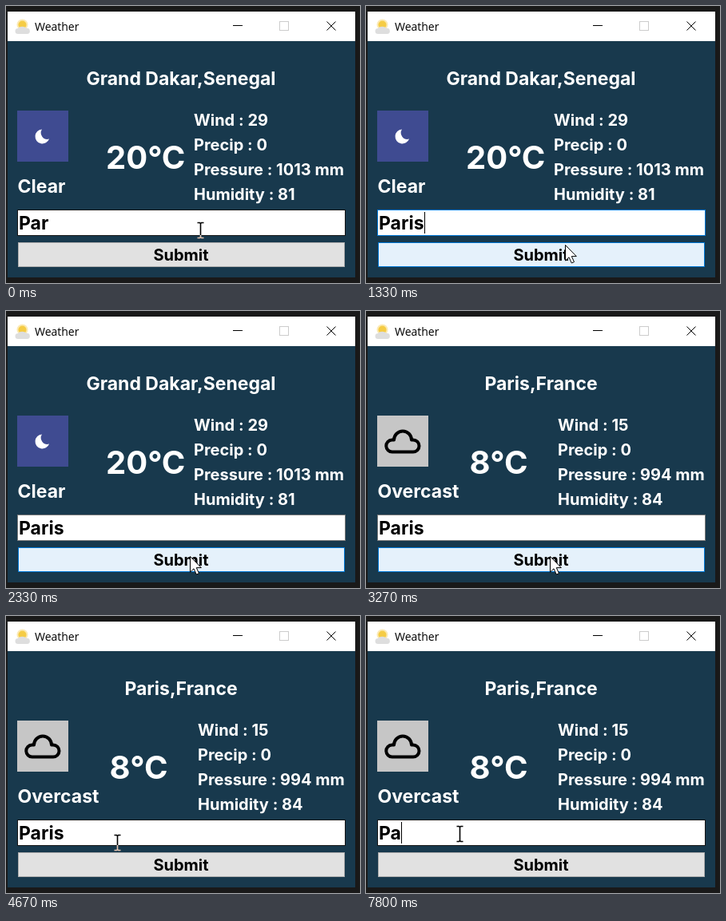
Write an HTML page that moves like this. It is 443x347 px and loops after 8 s.

```html
<!DOCTYPE html>
<html lang="en">
<head>
<meta charset="utf-8">
<title>Weather</title>
<style>
html, body { margin: 0; width: 100%; height: 100%; overflow: hidden; background: #191919; }
svg { display: block; width: 443px; height: 347px; }
text { font-family: Inter, "Liberation Sans", sans-serif; font-weight: 700; white-space: pre; }
.s { font-size: 20px; }
.m { font-size: 23px; }
.l { font-size: 40px; }
.w { fill: #fff; }
.bar { font: 400 14px "Open Sans", sans-serif; }
#beam { mix-blend-mode: difference; }
</style>
</head>
<body>
<svg viewBox="0 0 443 347">
  <rect width="443" height="347" fill="#191919"/>
  <rect x="2" y="7" width="435" height="333" fill="#18394d"/>
  <rect x="2" y="7" width="435" height="37" fill="#fff"/>

  <circle cx="20.500" cy="23.500" r="7" fill="#fbeab5"/>
  <circle cx="20.500" cy="23.500" r="5" fill="#f5cc45"/>
  <path d="M15 35a3.500 3.500 0 0 1 0-7a6 4.500 0 0 1 10.500 0a3.500 3.500 0 0 1 1.500 7z" fill="#dedede"/>
  <text class="bar" x="36" y="31">Weather</text>
  <g fill="none" shape-rendering="crispEdges">
    <path d="M284 24.500h12" stroke="#000"/>
    <rect x="342.500" y="19.500" width="11" height="11" stroke="#ccc"/>
  </g>
  <path d="M401.500 19.500l11 11m0-11l-11 11" stroke="#000"/>

  <g id="before" class="w">
    <rect x="14" y="131" width="64" height="64" fill="#3f4b91"/>
    <path d="M45 154.500a9 9 0 1 0 9 12a8 8 0 0 1-9-12z"/>
  </g>
  <g id="after" class="w">
    <rect x="14" y="131" width="64" height="64" fill="#c6c6c6"/>
    <path d="M33 176.500a7.500 7.500 0 0 1-.5-15h2.500a11 11 0 0 1 22 0h2a7.500 7.500 0 0 1 0 15z"
      fill="none" stroke="#000" stroke-width="4" stroke-linejoin="round"/>
  </g>

  <rect id="field" x="14.500" y="255.500" width="410" height="32" fill="#fff"/>
  <text id="typed" class="m" x="16" y="280"></text>
  <rect id="caret" y="258" width="1" height="27"/>
  <rect id="button" x="15.500" y="296.500" width="408" height="30"/>
  <text class="s" x="219" y="319" text-anchor="middle">Submit</text>

  <path id="beam" d="M-3.500-9.500h3l1 1l1-1h3M.5-8.500v17M-3.500 9.500h3l1-1l1 1h3" fill="none" stroke="#fff" stroke-width="1.600"/>
  <path id="arrow" d="M.5.5v19.500l4.500-4.200l3.300 7.200l3.200-1.400l-3.200-7h6z" fill="#fff" stroke="#000"/>
</svg>
<script>
const LOOP = 8000, FRAME = 1000 / 15, BLINK = 530;
const PRESS = 2200, RELEASE = 2330, REPLY = 3270, REFOCUS = 6400;
const $ = id => document.getElementById(id);

function label(group, cls, x, y, words, anchor = "start") {
  const el = document.createElementNS("http://www.w3.org/2000/svg", "text");
  el.setAttribute("class", cls);
  el.setAttribute("x", x);
  el.setAttribute("y", y);
  el.setAttribute("text-anchor", anchor);
  el.textContent = words;
  $(group).append(el);
}

function report(group, city, sky, temp, tempX, rowX, rows) {
  label(group, "m", 219, 99, city, "middle");
  label(group, "m", 14.5, 234, sky);
  label(group, "l", tempX, 204, temp);
  rows.forEach((row, i) => label(group, "s", rowX, 150 + 31 * i, row));
}

report("before", "Grand Dakar,Senegal", "Clear", "20°C", 125, 235,
  ["Wind : 29", "Precip : 0", "Pressure : 1013 mm", "Humidity : 81"]);
report("after", "Paris,France", "Overcast", "8°C", 129.5, 240,
  ["Wind : 15", "Precip : 0", "Pressure : 994 mm", "Humidity : 84"]);

const typing = [[0, "Par"], [130, "Paris"], [7530, "Pari"], [7670, "Par"], [7800, "Pa"]];

// Mouse moves: start, end, x, y.
const moves = [
  [0, 1, 243, 281], [800, 1000, 290, 267], [1000, 1130, 293, 286],
  [1200, 1330, 250, 298], [1330, 1530, 233, 306], [1600, 1670, 230, 307],
  [3800, 4200, 178, 289], [4330, 4670, 139, 284], [5070, 5130, 132, 284],
  [5270, 5400, 93, 278], [5800, 5930, 81, 274], [6070, 6270, 87, 274], [6900, 7070, 117, 273]
];

function mouse(t) {
  let x = 243, y = 281;
  for (const [from, to, toX, toY] of moves) {
    const k = Math.min(1, Math.max(0, (t - from) / (to - from)));
    const ease = k * (2 - k);
    x += (toX - x) * ease;
    y += (toY - y) * ease;
  }
  return [Math.round(x), Math.round(y)];
}

const show = (id, on) => $(id).setAttribute("visibility", on ? "visible" : "hidden");

function paint(id, fill, stroke) {
  $(id).setAttribute("fill", fill);
  $(id).setAttribute("stroke", stroke);
}

function draw(time) {
  // Hold each picture for one recorded frame.
  const t = Math.floor((time + 10) / FRAME) * FRAME + 5;
  const [x, y] = mouse(t);
  const overField = y < 288, overButton = y >= 296;
  const focused = t < PRESS || t >= REFOCUS;
  const pressed = t >= PRESS && t < RELEASE;

  show("before", t < REPLY);
  show("after", t >= REPLY);

  $("typed").textContent = typing.findLast(([from]) => from <= t)[1];
  const blinkFrom = t < REFOCUS ? 270 : REFOCUS;
  const lit = t >= 130 && (t - blinkFrom) % (2 * BLINK) < BLINK;
  show("caret", focused && lit);
  $("caret").setAttribute("x", Math.round(16.5 + $("typed").getComputedTextLength()));

  paint("field", "#fff", overField ? "#171717" : focused ? "#0078d7" : "#7a7a7a");
  if (pressed) paint("button", "#cce4f7", "#005499");
  else if (overButton) paint("button", "#e5f1fb", "#0078d7");
  else paint("button", "#e1e1e1", "#adadad");

  show("beam", overField);
  show("arrow", !overField);
  for (const id of ["beam", "arrow"]) $(id).setAttribute("transform", `translate(${x} ${y})`);
}

const start = performance.now();
function tick() {
  draw((performance.now() - start) % LOOP);
  requestAnimationFrame(tick);
}
tick();
</script>
</body>
</html>
```
